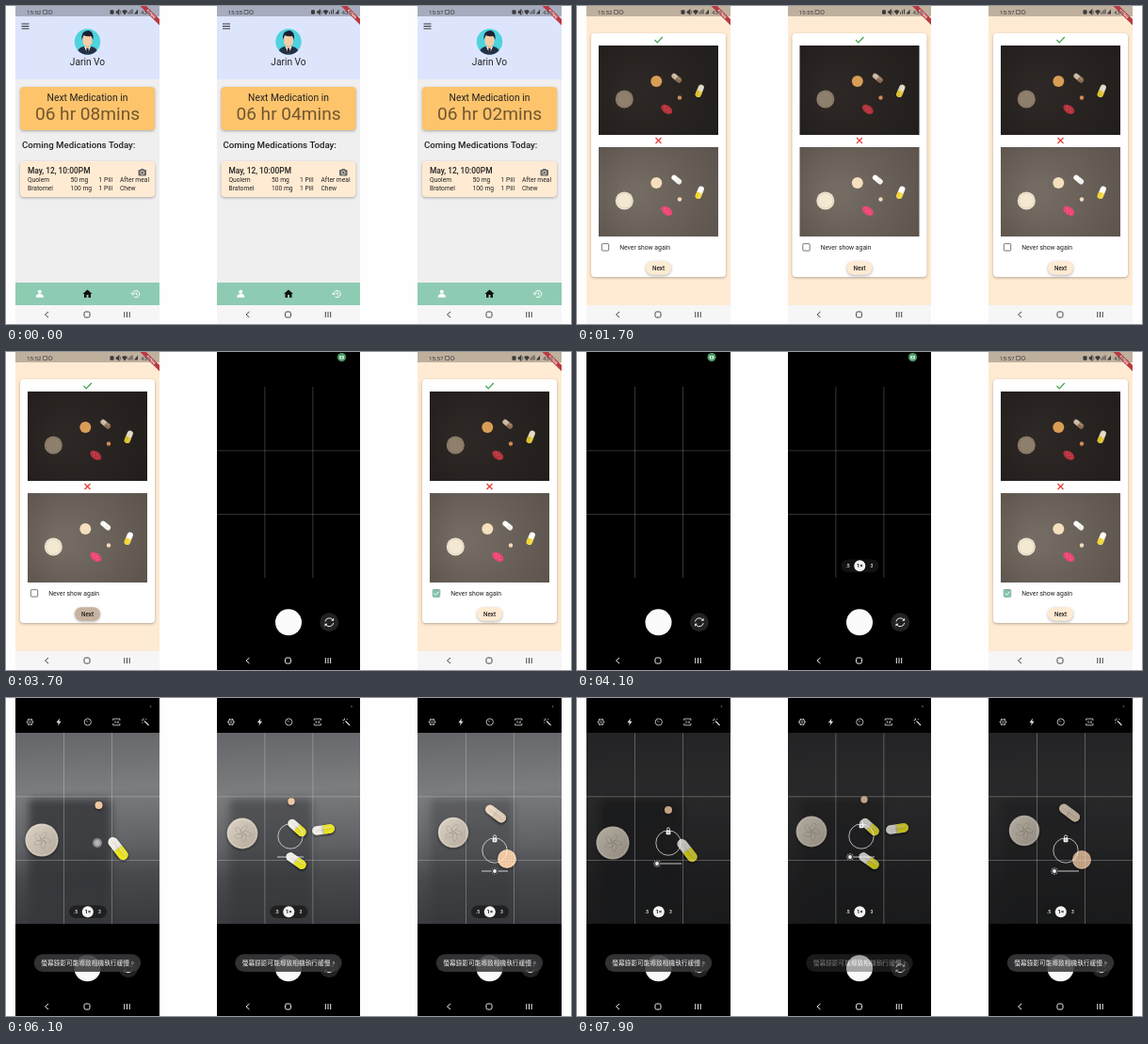
An HTML page with a canvas that plays this animation: 600 px wide and 338 px high, repeating every 8 s.

```html
<!DOCTYPE html>
<html lang="en">
<head>
<meta charset="utf-8">
<title>Medication app</title>
<style>
html, body { margin: 0; width: 100%; height: 100%; overflow: hidden; background: #fefefe; }
canvas { display: block; width: 600px; height: 338px; }
</style>
</head>
<body>
<canvas id="stage" width="600" height="338"></canvas>
<script>
const LOOP = 8000;
const stage = document.getElementById('stage').getContext('2d');
const layer = Object.assign(document.createElement('canvas'), { width: 600, height: 338 }).getContext('2d');
let g = stage;

// All coordinates are those of the left phone; the others are shifted by dx.
// Item poses are [x, y] at the times in POSE_TIMES.
const POSE_TIMES = [4800, 6100, 7900];
const phones = [
  { dx: 0, clock: '15:52', left: '06 hr 08mins', page: 400, check: 1e9, press: 3600, cam: 3950, zoom: 4150,
    view: 4480, toast: 4770, dot: 5650, focus: [97, 154], touch: 6020, lock: 6550, drag: 6850, shadow: .58,
    items: [
      { kind: 'coin', r: 17.6, pose: [[25, 161], [38, 151], [38, 154]] },
      { kind: 'tablet', r: 4, pose: [[88, 123], [98.5, 114], [97, 119]] },
      { kind: 'capsule', len: 28, w: 10.5, a: 52, pose: [[110, 169], [119, 160], [117, 162]] }] },
  { dx: 213.5, clock: '15:55', left: '06 hr 04mins', page: 895, check: 1e9, press: 3150, cam: 3450, zoom: 3800,
    view: 4150, toast: 4480, dot: 5400, focus: [88.5, 147], touch: 4740, lock: 6300, drag: 6500, shadow: .38,
    items: [
      { kind: 'coin', r: 16.4, pose: [[37.5, 143], [37.5, 144], [35.5, 142]] },
      { kind: 'tablet', r: 3.7, pose: [[91.5, 110], [89.5, 110], [91.5, 108]] },
      { kind: 'capsule', len: 23, w: 9.4, a: 42, pose: [[96.5, 137], [95.5, 138], [97.5, 137]] },
      { kind: 'capsule', len: 24, w: 9.4, a: -8, pose: [[125.5, 140], [123.5, 140], [126.5, 139]] },
      { kind: 'capsule', len: 24, w: 9.4, a: 35, pose: [[96.5, 173], [94.5, 173], [96.5, 173]] }] },
  { dx: 427, clock: '15:57', left: '06 hr 02mins', page: 805, check: 2900, press: 4130, cam: 4420, zoom: 4700,
    view: 5050, toast: 5300, dot: 5900, focus: [92, 162], touch: 5520, lock: 5950, drag: 6300, shadow: .28,
    items: [
      { kind: 'coin', r: 16.2, pose: [[48, 143], [48, 143], [48, 141]] },
      { kind: 'capsule', len: 25, w: 10, a: 37, tan: true, pose: [[92, 124], [93, 123], [96, 122]] },
      { kind: 'tablet', r: 10, pose: [[104, 171], [105, 171], [109, 172]] }] }
];

const clamp = v => Math.max(0, Math.min(1, v));
const ramp = (t, start, dur) => clamp((t - start) / dur);
const ease = v => v * v * (3 - 2 * v);
const mix = (a, b, k) => a + (b - a) * k;

function box(x, y, w, h, r, fill, stroke, lw = 1) {
  g.beginPath();
  g.roundRect(x, y, w, h, r);
  if (fill) { g.fillStyle = fill; g.fill(); }
  if (stroke) { g.strokeStyle = stroke; g.lineWidth = lw; g.stroke(); }
}
function disc(x, y, r, fill, stroke, lw = 1) { box(x - r, y - r, 2 * r, 2 * r, r, fill, stroke, lw); }
function band(y, h, fill) { box(10, y, 153, h, 0, fill); }
function path(d, x, y, stroke, lw = 1, fill) {
  const p = new Path2D(d);
  g.save();
  g.translate(x, y);
  if (fill) { g.fillStyle = fill; g.fill(p); }
  if (stroke) { g.strokeStyle = stroke; g.lineWidth = lw; g.stroke(p); }
  g.restore();
}
function text(s, x, y, size, color = '#222', align = 'left', weight = 400) {
  g.font = `${weight} ${size}px Roboto, "Noto Sans CJK TC", "Noto Sans CJK", sans-serif`;
  g.textAlign = align;
  g.fillStyle = color;
  g.fillText(s, x, y);
}
function card(x, y, w, h, r, fill) {
  g.save();
  g.shadowColor = 'rgba(0,0,0,.3)';
  g.shadowBlur = 3;
  g.shadowOffsetY = 1;
  box(x, y, w, h, r, fill);
  g.restore();
}
// Draws a group with one common opacity.
function fade(alpha, draw) {
  if (alpha <= 0) return;
  if (alpha >= 1) return draw();
  const below = g;
  layer.setTransform(1, 0, 0, 1, 0, 0);
  layer.clearRect(0, 0, 600, 338);
  layer.setTransform(below.getTransform());
  g = layer;
  draw();
  g = below;
  g.save();
  g.setTransform(1, 0, 0, 1, 0, 0);
  g.globalAlpha = alpha;
  g.drawImage(layer.canvas, 0, 0);
  g.restore();
}

function capsule(x, y, len, w, deg, first, second) {
  g.save();
  g.translate(x, y);
  g.rotate(deg * Math.PI / 180);
  box(-len / 2, -w / 2, len, w, w / 2, first);
  box(0, -w / 2, len / 2, w, [0, w / 2, w / 2, 0], second);
  box(-len / 2 + w / 3, -w / 4, len - w / 1.5, w / 6, 1, 'rgba(255,255,255,.35)');
  g.restore();
}

function statusBar(ph) {
  band(0, 11, 'rgba(0,0,0,.25)');
  // corner ribbon
  g.save();
  g.translate(162.5, 0);
  g.rotate(Math.PI / 4);
  box(-16, 9.6, 32, 4.6, 0, '#b83a42');
  text('DEBUG', 0, 13.2, 3.6, '#fff', 'center', 900);
  g.restore();
  const ink = '#3a3a3a';
  text(ph.clock, 22, 8.8, 6.2, ink);
  box(39.5, 4.5, 4, 4, 0, null, ink, .6);
  disc(47, 6.6, 2, null, ink, .7);
  box(110.5, 4.3, 4, 4.4, 1, ink);
  path('M-2-1H-1L1-3V3L-1 1H-2ZM2-2L3 2', 119, 6.5, ink, .6, ink);
  path('M-3-1Q0-4 3-1L0 3Z', 126, 6.5, null, 1, ink);
  path('M-2 2V0M0 2V-2M2 2V-3', 132, 6.5, ink, 1);
  path('M-2 2L2-3V2Z', 138, 6.5, null, 1, ink);
  text('43%', 143, 8.8, 6.2, ink);
}

function systemNav(bg, ink) {
  band(318, 20, bg);
  path('M2-3L-1.5 0L2 3', 43, 328, ink, 1);
  box(83, 325, 6, 6, 1.6, null, ink, 1);
  path('M-2.7-3V3M0-3V3M2.7-3V3', 128.5, 328, ink, 1);
}

function avatar() {
  g.save();
  g.beginPath();
  g.arc(86.5, 38, 13.7, 0, 7);
  g.clip();
  box(72, 24, 29, 29, 0, '#4fd3de');
  path('M-11 14Q-11 6-4 5H4Q11 6 11 14Z', 86.5, 38, null, 1, '#253044');
  path('M-3.5 5H3.5L0 13Z', 86.5, 38, null, 1, '#fff');
  path('M-1 6H1L1.3 11L0 13L-1.3 11Z', 86.5, 38, null, 1, '#1c2233');
  box(84.3, 39, 4.4, 6, 2, '#e8b48c');
  box(81.5, 30, 10, 13, 5, '#f6cda6');
  path('M-6 0Q-7-10 1-10Q7-9 6 0L4-4Q-1-3-4-5Z', 86.5, 36, null, 1, '#1c2233');
  g.restore();
}

function home(ph) {
  band(0, 318, '#efefef');
  band(0, 78, '#dde5fd');
  path('M-4-2.5H4M-4 0H4M-4 2.5H4', 20.5, 21.5, '#333', 1);
  avatar();
  text('Jarin Vo', 86.5, 62.8, 10.2, '#222', 'center');
  card(15, 86, 143, 46, 4, '#fec46c');
  text('Next Medication in', 86.5, 100.6, 10.3, '#222', 'center');
  text(ph.left, 86.5, 121, 19.1, 'rgba(0,0,0,.56)', 'center');
  text('Coming Medications Today:', 17, 151.2, 9.7, '#222', 'left', 500);
  card(15, 165, 143, 38, 4, '#ffebd3');
  text('May, 12, 10:00PM', 23, 177.6, 8.4, '#222', 'left', 500);
  box(140.5, 174, 8.5, 6.4, 1, '#666');
  box(143, 173, 3.5, 2, 0, '#666');
  disc(144.7, 177.2, 1.9, '#666', '#ffebd3', .8);
  [['Quolem', '50 mg', '1 Pill', 'After meal'], ['Bratomel', '100 mg', '1 Pill', 'Chew']].forEach((row, i) =>
    row.forEach((s, j) => text(s, [23, 68.5, 98.5, 121][j], 187.4 + i * 8.4, 6.7)));
  band(294, 24, '#8dccb2');
  disc(35.8, 303.8, 2, '#fff');
  path('M-4 3Q-4 0 0 0Q4 0 4 3V3.8H-4Z', 35.8, 306, null, 1, '#fff');
  path('M0-4.5L5 0H3.5V4H1V1H-1V4H-3.5V0H-5Z', 86.5, 306, null, 1, '#111');
  path('M-3 0A3.6 3.6 0 1 1-1.5 3M-5-.8L-3 1L-1-.8M.7-2V.4L2.4 1.4', 137.5, 306, '#fff', 1);
}

function photo(y, bright) {
  const fill = g.createRadialGradient(60, y + 50, 10, 86, y + 48, 85);
  fill.addColorStop(0, bright ? '#746c63' : '#2d2825');
  fill.addColorStop(1, bright ? '#5b534b' : '#211d1b');
  box(23, y, 127, 95, 0, fill);
  const c = bright
    ? ['#f3e8d2', '#f5dfbd', '#fff', '#efeeea', '#f4d9bb', '#ec4775', '#fff', '#f2d52e']
    : ['#8f7f6d', '#d99e55', '#c9b6a0', '#8b6a52', '#cd8a58', '#b5323d', '#e3d8c2', '#d9c026'];
  disc(50.3, y + 57, 9.5, c[0]);
  disc(50.3, y + 57, 8, null, 'rgba(60,40,20,.12)', .8);
  disc(84.3, y + 38, 6, c[1]);
  capsule(105.7, y + 34.5, 12, 5.4, 38, c[2], c[3]);
  disc(109, y + 55.5, 2.2, c[4]);
  capsule(130.3, y + 48.3, 14, 6.2, 112, c[6], c[7]);
  g.save();
  g.translate(95.3, y + 67.8);
  g.rotate(.6);
  g.beginPath();
  g.ellipse(0, 0, 6.6, 4.2, 0, 0, 7);
  g.fillStyle = c[5];
  g.fill();
  for (let i = -3; i <= 3; i += 2) disc(i, (i & 2) - 1, .5, 'rgba(255,255,255,.4)');
  g.restore();
}

function dialog(ph, t, shift, compact) {
  band(0, 318, '#ffebd3');
  g.save();
  g.translate(0, shift);
  const [top, height, tick, cross, label, button] = compact
    ? [124, 69, 131, 145, 161, 183] : [29, 259, 36, 143, 256.5, 278.5];
  card(15, top, 143, height, 4, '#fff');
  path('M-4 0L-1.3 2.8L4.3-3', 86.5, tick, '#45a04b', 1.2);
  path('M-3-3L3 3M3-3L-3 3', 86.5, cross, '#e53935', 1.2);
  if (!compact) {
    photo(42, false);
    photo(150, true);
  }
  const on = ramp(t, ph.check, 150);
  box(26.3, label - 3.8, 7.4, 7.4, .8, null, '#666', .9);
  if (on) {
    g.globalAlpha = on;
    box(26, label - 4.1, 8, 8, .8, '#84c4ab');
    path('M-2.4 0L-.7 1.8L2.6-1.8', 30, label, '#fff', 1);
    g.globalAlpha = 1;
  }
  text('Never show again', 45.2, label + 2.4, 6.8);
  card(73, button - 7.3, 27, 14.6, 7.3, '#ffebd3');
  const pressed = ramp(t, ph.press, 100);
  if (pressed) box(73, button - 7.3, 27, 14.6, 7.3, `rgba(70,50,40,${.3 * pressed})`);
  text('Next', 86.5, button + 2.3, 6.3, '#222', 'center', 500);
  g.restore();
}

function drawItem(it, t) {
  const [a, b, c] = it.pose;
  const k1 = ease(ramp(t, POSE_TIMES[0], POSE_TIMES[1] - POSE_TIMES[0]));
  const k2 = ease(ramp(t, POSE_TIMES[1], POSE_TIMES[2] - POSE_TIMES[1]));
  const [x, y] = [0, 1].map(i => mix(mix(a[i], b[i], k1), c[i], k2));
  g.save();
  g.shadowColor = 'rgba(0,0,0,.5)';
  g.shadowBlur = 3;
  g.shadowOffsetY = 1;
  if (it.kind === 'capsule') {
    capsule(x, y, it.len, it.w, it.a, it.tan ? '#ead9c2' : '#f3f0e8', it.tan ? '#e0cdb4' : '#ece622');
  } else if (it.kind === 'coin') {
    const fill = g.createLinearGradient(x - it.r, y - it.r, x + it.r, y + it.r);
    fill.addColorStop(0, '#ddd5c8');
    fill.addColorStop(1, '#b3a899');
    disc(x, y, it.r, fill);
    g.shadowColor = 'transparent';
    disc(x, y, it.r - 1.2, null, 'rgba(240,234,222,.5)', .8);
    for (let i = 0; i < 5; i++) {
      const q = i * 1.257;
      g.beginPath();
      g.ellipse(x + 5 * Math.cos(q), y + 5 * Math.sin(q), 4.5, 2.2, q + .4, 0, 7);
      g.strokeStyle = 'rgba(80,72,62,.22)';
      g.lineWidth = .8;
      g.stroke();
    }
  } else {
    disc(x, y, it.r, '#f3cca6');
    g.shadowColor = 'transparent';
    const step = it.r / 3.4;
    for (let i = -2; i <= 2; i++)
      for (let j = -2; j <= 2; j++)
        if (i * i + j * j < 7) disc(x + i * step, y + j * step, step / 4, 'rgba(170,100,55,.28)');
  }
  g.restore();
}

function preview(ph, t, dim) {
  g.save();
  g.beginPath();
  g.rect(10, 37, 153, 203);
  g.clip();
  const fill = g.createLinearGradient(80, 37, 92, 240);
  fill.addColorStop(0, '#66676a');
  fill.addColorStop(.3, '#7c7d7f');
  fill.addColorStop(.6, '#5f6164');
  fill.addColorStop(.75, '#484a4d');
  fill.addColorStop(1, '#393b3e');
  band(37, 203, fill);
  // shadow of the hand-held device, fading out towards the dark lower edge
  const k = ease(ramp(t, POSE_TIMES[0], POSE_TIMES[1] - POSE_TIMES[0]));
  const top = mix(113, 107, k);
  const shade = g.createLinearGradient(0, top, 0, 240);
  shade.addColorStop(0, `rgba(22,23,27,${ph.shadow})`);
  shade.addColorStop(.5, `rgba(22,23,27,${ph.shadow * .75})`);
  shade.addColorStop(1, 'rgba(22,23,27,.1)');
  g.filter = 'blur(4px)';
  box(24, top, 88, 150, 5, shade);
  g.filter = 'none';
  band(37, 203, `rgba(20,20,21,${.72 * dim})`);
  ph.items.forEach(it => drawItem(it, t));
  band(37, 203, `rgba(10,10,10,${.2 * dim})`);
  g.restore();
}

function controls() {
  const w = '#e4e4e4';
  disc(25.5, 25.5, 2.9, null, w, .8);
  for (let i = 0; i < 6; i++) disc(25.5 + 3.3 * Math.cos(i * 1.047), 25.5 + 3.3 * Math.sin(i * 1.047), .6, w);
  disc(25.5, 25.5, 1, null, w, .6);
  path('M1-4L-2.6.7H-.3L-1 4L2.6-.8H.3Z', 56, 25.5, null, 1, w);
  disc(86.8, 25.5, 3.6, null, w, .8);
  path('M0 0L-1.7-1.7', 86.8, 25.5, w, .8);
  path('M-3.6-1.6V-3.4H3.6V-1.6M-3.6 1.6V3.4H3.6V1.6', 117.3, 25.5, w, .8);
  text('3:4', 117.3, 26.9, 3.6, w, 'center', 500);
  path('M-1-1L3.5 3.5', 148, 25.5, w, 1.1);
  path('M-2-4V-2M-4-2H-2.5M1-3.5L.5-2.5M-3.5 1L-2.5.5', 148, 25.5, w, .8);
}

function focusRing(ph, t) {
  const [x, y] = ph.focus;
  const age = t - ph.touch;
  if (age < 0) return;
  if (age < 150) {
    disc(x, y, 5, 'rgba(190,190,190,.6)');
    disc(x, y, 3, 'rgba(235,235,235,.45)');
    return;
  }
  const w = '#f2f2f2';
  const sun = -12 * ease(ramp(t, ph.drag, 800));
  disc(x, y, mix(16, 13.2, ramp(age, 150, 150)), null, w, .7);
  box(x - 14, y + 21.6, 28, .8, 0, w);
  if (t >= ph.lock) {
    box(x - 2.4, y - 13.2, 4.8, 4.4, 1, w);
    path('M-1.5 0V-1.5A1.5 1.5 0 0 1 1.5-1.5V0', x, y - 13.2, w, .8);
    disc(x, y - 11, .7, '#444');
    disc(x + sun, y + 22, 3.9, '#3a3b3d');
    disc(x + sun, y + 22, 1.9, w);
    for (let i = 0; i < 8; i++) {
      const q = i * Math.PI / 4;
      disc(x + sun + 3.2 * Math.cos(q), y + 22 + 3.2 * Math.sin(q), .45, w);
    }
  }
}

function camera(ph, t) {
  band(0, 338, '#000');
  const shown = ramp(t, ph.view, 150);
  fade(shown, () => {
    preview(ph, t, ease(ramp(t, ph.drag, 800)));
    controls();
  });
  const grid = shown ? 'rgba(225,225,225,.38)' : 'rgba(150,150,150,.45)';
  [61, 112].forEach(x => box(x, 37, .8, 203, 0, grid));
  [104.4, 172].forEach(y => band(y, .8, grid));
  if (shown) focusRing(ph, t);
  if (t >= ph.zoom) {
    box(67, 220.5, 40, 13.5, 6.8, 'rgba(25,25,25,.75)');
    disc(86.8, 227.2, 6, '#f4f4f4');
    text('.5', 74, 229.2, 5, '#eee', 'center', 500);
    text('1×', 86.8, 229.4, 5.8, '#111', 'center', 700);
    text('3', 99.3, 229.2, 5, '#eee', 'center', 500);
  }
  disc(86.5, 287.3, 14, '#fafafa');
  disc(129.8, 287.3, 10, '#222');
  path('M-4.4-.8A4.5 4.5 0 0 1 3.5-2.8M4.4.8A4.5 4.5 0 0 1-3.5 2.8', 129.8, 287.3, '#eee', 1);
  path('M4.8-4.5V-1.5H1.8ZM-4.8 4.5V1.5H-1.8Z', 129.8, 287.3, null, 1, '#eee');
  const small = ramp(t, ph.dot, 120);
  disc(mix(143, 153.5, small), mix(5.6, 9, small), mix(4.6, .8, small), '#4a9a66');
  if (!small) {
    box(140.7, 3.9, 4.6, 3.6, .8, '#e8fff0');
    disc(143, 5.7, 1.1, '#4a9a66');
  }
  fade(Math.min(ramp(t, ph.toast, 200), 1 - ramp(t, ph.toast + 3270, 300)), () => {
    box(29.8, 272.3, 113.4, 18.6, 9.3, 'rgba(58,58,60,.88)');
    text('螢幕錄影可能導致相機執行緩慢。', 37.3, 284.2, 6.7, '#f5f5f5');
  });
  systemNav('#000', '#eee');
}

function drawPhone(ph, t) {
  const x0 = Math.floor(10.5 + ph.dx);
  const x1 = Math.ceil(162.5 + ph.dx);
  g.save();
  g.beginPath();
  g.rect(x0, 0, x1 - x0, 338);
  g.clip();
  g.translate(ph.dx, 0);
  const opened = ramp(t, ph.cam, 120);
  if (opened < 1) {
    const p = ramp(t, ph.page, 300);
    if (p < 1) home(ph);
    fade(p, () => dialog(ph, t, 20 * (1 - p) ** 2, p < .5));
    statusBar(ph);
    systemNav('#f6f6f6', '#444');
  }
  fade(opened, () => camera(ph, t));
  g.restore();
}

function frame() {
  const t = performance.now() % LOOP;
  g.fillStyle = '#fefefe';
  g.fillRect(0, 0, 600, 338);
  phones.forEach(ph => drawPhone(ph, t));
  requestAnimationFrame(frame);
}
requestAnimationFrame(frame);
</script>
</body>
</html>
```
